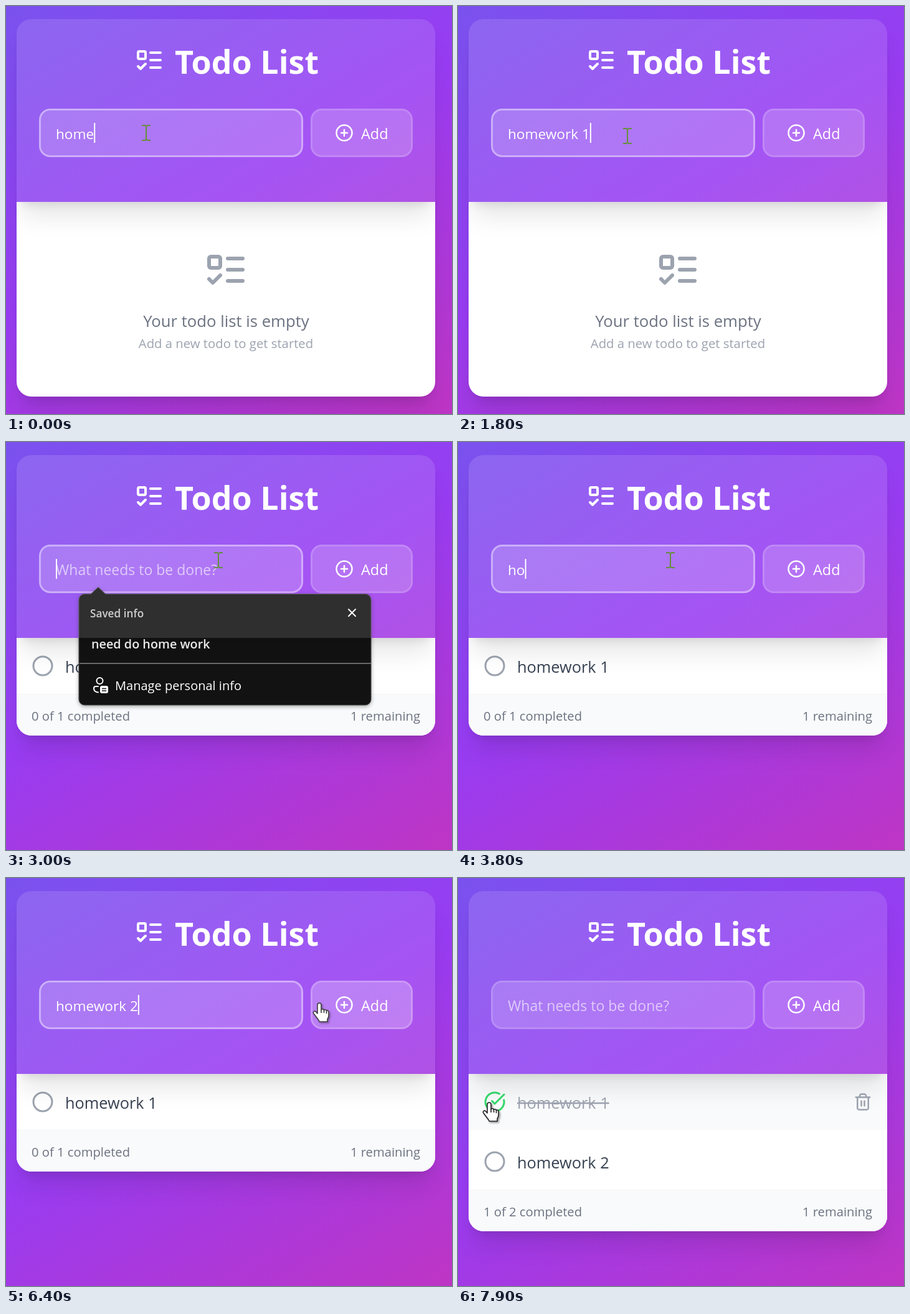
An HTML page that plays this animation: 716 by 656 pixels, repeating every 8000 ms.

```html
<!DOCTYPE html>
<html lang="en">
<head>
<meta charset="utf-8">
<title>Todo List</title>
<style>
  html, body { margin: 0; width: 100%; height: 100%; overflow: hidden; }
  body { background: linear-gradient(150.2deg, #7a52ee, #983cf2 47%, #be35c4); }
  #stage { position: absolute; left: 0; top: 0; width: 716px; height: 656px; overflow: hidden; }
  #stage div { position: absolute; box-sizing: border-box; }
  #card, #head { box-shadow: 0 30px 37.5px -7.5px #0000001a, 0 12px 15px -9px #0000001a; }
  #card { left: 17px; top: 21px; width: 672px; border-radius: 24px; overflow: hidden; }
  #head { width: 100%; height: 294px; background: #ffffff1f; z-index: 1; }
  #body { top: 294px; bottom: 0; width: 100%; background: #fff; }
  #hover { width: 100%; height: 90px; background: #f9fafb; }
  #foot { bottom: 0; width: 100%; height: 67px; background: #f9fafb; border-top: 1.5px solid #f3f4f6; }
  .field { top: 165px; height: 78px; border: 3px solid #ffffff4d; border-radius: 18px; background: #ffffff2e; background-clip: padding-box; }
  .field.on { border-color: #ffffff80; }
  #add.on { background-color: #ffffff40; border-color: #ffffff66; }
  svg { position: absolute; left: 0; top: 0; }
  text { font-family: "Open Sans", "Noto Sans", sans-serif; white-space: pre; }
  .line { fill: none; stroke: currentColor; stroke-width: 2; stroke-linecap: round; stroke-linejoin: round; }
  .gray { color: #9ca3af; }
  .done text { fill: #9ca3af; text-decoration: line-through; }
  #hand { filter: drop-shadow(2px 2px 1.5px #0006); }
</style>
</head>
<body>
<div id="stage">
  <div id="card">
    <div id="head"></div>
    <div id="body"><div id="hover"></div><div id="foot"></div></div>
  </div>
  <div id="input" class="field" style="left:53px;width:424px"></div>
  <div id="add" class="field" style="left:489px;width:164px"></div>

  <svg width="716" height="656" viewBox="0 0 716 656">
    <defs>
      <g id="list" class="line">
        <rect x="3" y="5" width="6" height="6" rx="1"/>
        <path d="m3 17 2 2 4-4M13 6h8M13 12h8M13 18h8"/>
      </g>
      <g id="row">
        <circle class="open line" cx="12" cy="12" r="10" transform="translate(41 342) scale(1.5)"/>
      </g>
    </defs>

    <g color="#fff" fill="#fff">
      <use href="#list" transform="translate(206 63) scale(2)"/>
      <text x="271" y="109" font-size="52" font-weight="700">Todo List</text>
      <g class="line" transform="translate(528 189) scale(1.25)">
        <circle cx="12" cy="12" r="10"/><path d="M8 12h8M12 8v8"/>
      </g>
      <text x="570" y="214" font-size="23.5">Add</text>
      <text id="hint" x="80" y="214" font-size="23" fill-opacity=".62">What needs to be done?</text>
      <text id="typed" x="80" y="214" font-size="22.6"></text>
      <rect id="caret" y="188" width="2" height="32"/>
    </g>

    <g id="empty" class="gray" text-anchor="middle">
      <use href="#list" transform="translate(317 388) scale(3)"/>
      <text x="353.5" y="516" font-size="25.7" fill="#6b7280">Your todo list is empty</text>
      <text x="353" y="550" font-size="20.3" fill="currentColor">Add a new todo to get started</text>
    </g>

    <g id="row1" class="gray" fill="#374151">
      <use id="open1" href="#row"/>
      <path id="check" class="line" color="#35d96c" transform="translate(41 342) scale(1.5)"
        d="M21.8 10A10 10 0 1 1 17 3.335M9 11l3 3L22 4"/>
      <text x="95" y="371" font-size="25.3">homework 1</text>
      <path id="trash" class="line" transform="translate(635 345) scale(1.25)"
        d="M3 6h18M19 6v14c0 1-1 2-2 2H7c-1 0-2-1-2-2V6M8 6V4c0-1 1-2 2-2h4c1 0 2 1 2 2v2M10 11v6M14 11v6"/>
    </g>
    <g id="row2" class="gray" fill="#374151" transform="translate(0 96)">
      <use href="#row"/>
      <text x="95" y="371" font-size="25.3">homework 2</text>
    </g>
    <g id="totals" fill="#6b7280" font-size="20.2">
      <text id="count" x="41"></text>
      <text x="665" text-anchor="end">1 remaining</text>
    </g>

    <g id="popup" fill="#fff" color="#fff" style="filter:drop-shadow(0 2px 3px #0005)">
      <path fill="#121212" stroke="#4a4a4a" d="M126 244.500H136L148 233.500 160 244.500H577a9 9 0 0 1 9 9V414a9 9 0 0 1-9 9H126a9 9 0 0 1-9-9V253.500a9 9 0 0 1 9-9z"/>
      <text x="135" y="282" font-size="17.200" font-weight="600" fill="#c8c8c8">Saved info</text>
      <text x="137" y="332" font-size="19.800" font-weight="600">need do home work</text>
      <text x="175" y="399" font-size="20">Manage personal info</text>
      <path d="M118 356H586" stroke="#6a6a6a" stroke-width="2"/>
      <path class="line" stroke-width="2" d="M550 269l11 11M561 269l-11 11"/>
      <g class="line">
        <circle cx="150.500" cy="384" r="5"/>
        <path d="M148 393h-4q-3 0-3 3 0 6 7 6.500"/>
      </g>
      <rect x="151" y="392" width="13" height="12" rx="3"/>
      <path d="M154 396.500h7M154 400h7" stroke="#121212" stroke-width="1.500"/>
    </g>

    <g id="pointer">
      <path id="beam" fill="none" stroke="#4f7f1f" stroke-width="2" d="M-7-12h5l2 1.500 2-1.500h5M0-11V11M-7 12h5l2-1.500 2 1.500h5"/>
      <g id="hand" stroke="#222" stroke-width="1.600" stroke-linejoin="round">
        <path fill="#fff" d="M-3 3a3 3 0 0 1 6 0v8c0-2 4.500-1.500 4.500 1 0-2 4-1.500 4 1 0-2 3.500-1 3.500 1.500v6c0 3-2 4-2 6v3.500H0c0-2-1.500-3-3-5l-6-8c-2-3 1.500-5 3.500-3l2.500 3z"/>
        <path fill="none" d="M3 11v5M7.500 12v4M11.500 13v4"/>
      </g>
      <path id="arrow" fill="#fff" stroke="#222" stroke-width="1.500" d="M0 0v24l6-5 4 9 4-2-4-8h8z"/>
    </g>
  </svg>
</div>

<script>
const LOOP = 8000;
const ADD_FIRST = 2300, REFOCUS = 2800, ADD_SECOND = 6800, TICK = 7700;
const KEYS_1 = [0, 0, 0, 0, 200, 350, 500, 650, 1000, 1400];
const KEYS_2 = [3600, 3750, 4000, 4150, 4300, 4450, 4600, 4750, 5150, 5320];
// Pointer stops: time, x, y
const PATH = [
  [0, 225, 204], [1200, 225, 204], [1700, 272, 209], [1850, 272, 209],
  [2150, 520, 212], [2400, 520, 212], [2750, 341, 190], [5600, 341, 190],
  [6350, 503, 201], [6450, 503, 201], [6650, 525, 207], [6950, 525, 207],
  [7550, 50, 361], [LOOP, 50, 361]
];

const $ = id => document.getElementById(id);
const show = (id, on) => { $(id).style.display = on ? "" : "none"; };
const inside = (x, y, l, t, r, b) => x >= l && x <= r && y >= t && y <= b;

function pointerAt(t) {
  const i = PATH.findIndex(p => p[0] > t);
  const [t0, x0, y0] = PATH[i - 1], [t1, x1, y1] = PATH[i];
  const u = (t - t0) / (t1 - t0), e = u * u * (3 - 2 * u);
  return [x0 + (x1 - x0) * e, y0 + (y1 - y0) * e];
}

function drawInput(t) {
  const focus = t < ADD_FIRST || (t >= REFOCUS && t < ADD_SECOND);
  const first = t < ADD_FIRST;
  const pressed = (first ? KEYS_1 : KEYS_2).filter(k => k <= t);
  const text = focus ? ("homework " + (first ? 1 : 2)).slice(0, pressed.length) : "";
  const lastKey = pressed.length ? pressed[pressed.length - 1] : REFOCUS;
  $("typed").textContent = text;
  show("hint", !text);
  show("caret", focus && (t - lastKey) % 1060 < 530);
  $("caret").setAttribute("x", 80 + (text ? $("typed").getComputedTextLength() : 0));
  $("input").classList.toggle("on", focus);
  show("popup", t >= REFOCUS && t < KEYS_2[0]);
}

function drawList(t, hover) {
  const items = (t >= ADD_FIRST) + (t >= ADD_SECOND), done = t >= TICK;
  const bottom = items ? 376 + 96 * items : 628;
  $("card").style.height = bottom - 21 + "px";
  show("empty", !items);
  show("row1", items > 0);
  show("row2", items > 1);
  show("foot", items);
  show("totals", items);
  $("totals").setAttribute("transform", `translate(0 ${bottom - 24})`);
  $("count").textContent = `${+done} of ${items} completed`;
  // The second item stays open, so one or both remain.
  $("count").nextElementSibling.textContent = `${items - done} remaining`;
  $("row1").classList.toggle("done", done);
  show("open1", !done);
  show("check", done);
  show("hover", items && hover);
  show("trash", hover);
}

function drawPointer(x, y) {
  const onInput = inside(x, y, 53, 165, 477, 243);
  const onAdd = inside(x, y, 489, 165, 653, 243);
  const onCircle = inside(x, y, 41, 342, 77, 378);
  show("beam", onInput);
  show("hand", onAdd || onCircle);
  show("arrow", !onInput && !onAdd && !onCircle);
  $("add").classList.toggle("on", onAdd);
  $("pointer").setAttribute("transform", `translate(${x} ${y})`);
}

function draw(t) {
  const [x, y] = pointerAt(t);
  drawInput(t);
  drawList(t, inside(x, y, 17, 315, 689, 405));
  drawPointer(x, y);
}

const start = performance.now();
function frame() {
  draw((performance.now() - start) % LOOP);
  requestAnimationFrame(frame);
}
frame();
</script>
</body>
</html>
```
